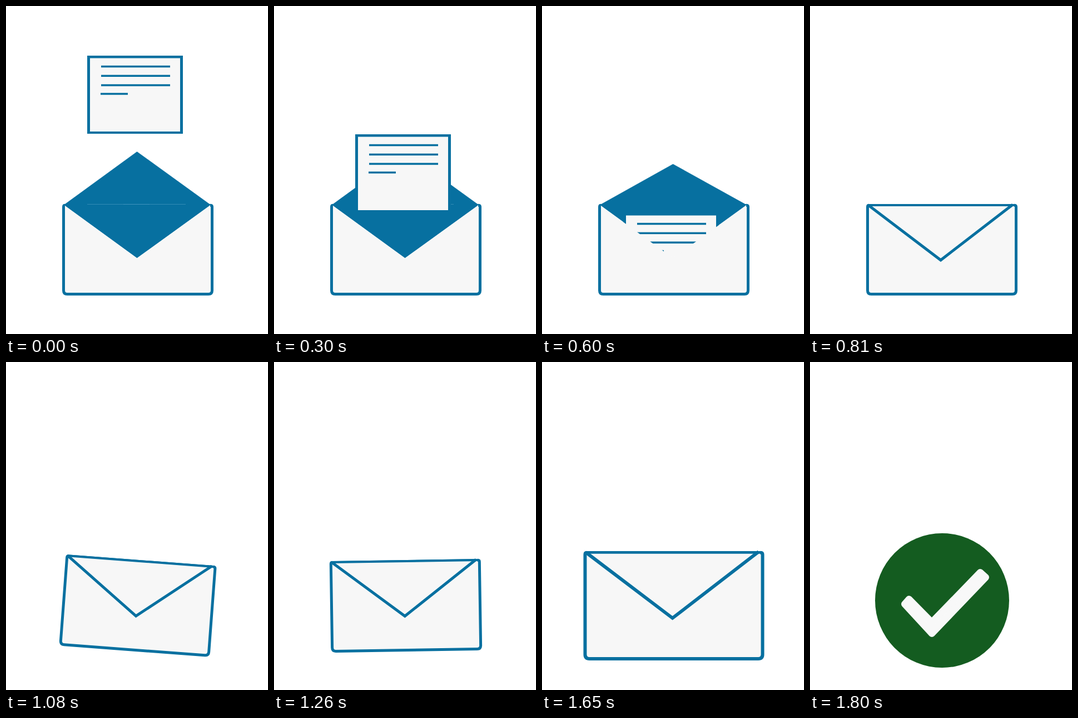
An HTML page that plays this animation: 471x588 px, repeating every 1980 ms.

```html
<!DOCTYPE html>
<html lang="en">
<head>
<meta charset="utf-8">
<title>Letter sent</title>
<style>
  html, body { margin: 0; width: 100%; height: 100%; overflow: hidden; background: #fff; }
  svg { display: block; width: 100%; height: 100%; }
  .ink { fill: #0770a0; }
  .paper { fill: #f7f7f7; }
  .line { fill: none; stroke: #0770a0; }
</style>
</head>
<body>
<svg viewBox="0 0 471 588">
  <g id="mail">
    <path id="flapUp" class="ink"/>
    <path class="ink" d="M105 355H368L366 358 235.5 452 106 358Z"/>
    <g id="seam" stroke="#3f93bd">
      <path d="M146 355.5H323" opacity=".75"/>
      <path d="M211 355.5H258"/>
    </g>
    <g id="letter">
      <path class="ink" d="M146 89H318V229H146Z"/>
      <path class="paper" d="M151 93.5H313V225H151Z"/>
      <path class="line" stroke-width="3.5" d="M171 108.6H295M171 125.2H295M171 141.9H295M170 157.5H219"/>
    </g>
    <path class="paper" d="M105 357.5L235.5 452 367 357.5H371V516H104V357.5Z"/>
    <g id="flapDown">
      <path id="cover" class="paper"/>
      <path id="fold" class="line" stroke-width="5"/>
      <path class="line" stroke-width="4" d="M104 357H370"/>
    </g>
    <path class="line" stroke-width="5" d="M106 357.3Q103.5 357.3 103.5 360V510Q103.5 516.5 110 516.5H364Q370.5 516.5 370.5 510V360Q370.5 357.3 367 357.3"/>
  </g>
  <g id="badge">
    <circle cx="237.5" cy="427.5" r="120.5" fill="#145c20"/>
    <path d="M170 434L178 425 219 466.5 306 377 316 386 219 487Z" fill="#f8f8f8" stroke="#f8f8f8" stroke-width="12" stroke-linejoin="round"/>
  </g>
</svg>
<script>
const LOOP = 1980, STEP = 30, SWAP = 1680;
const el = id => document.getElementById(id);
const part = (t, a, b) => Math.min(1, Math.max(0, (t - a) / (b - a)));
const ease = p => p * p * (3 - 2 * p);
const mix = (a, b, p) => a + (b - a) * p;
const show = (id, on) => el(id).setAttribute('display', on ? 'inline' : 'none');
const about = (x, y, op) => `translate(${x} ${y}) ${op} translate(${-x} ${-y})`;

function drawFlap(t) {
  const turn = Math.cos(Math.PI * part(t, 540, 810));
  const open = turn > 0;
  show('flapUp', open);
  show('seam', t < 570);
  show('flapDown', !open);
  if (open) {
    el('flapUp').setAttribute('d', `M104 356.5L235.5 ${356 - 95 * turn} 368 356.5Z`);
  } else {
    const tip = 356 - 99.5 * turn;
    el('cover').setAttribute('d', `M106 357L235 ${tip} 364 357Z`);
    el('fold').setAttribute('d', `M105.5 357.5L235 ${tip} 364.5 356`);
  }
}

function draw(t) {
  el('letter').setAttribute('transform', `translate(0 ${282 * ease(part(t, 0, 600))})`);
  show('letter', t < 810);
  drawFlap(t);

  // one rock to each side, then swell until the badge takes over
  const tilt = 4.8 * Math.sin(2 * Math.PI * part(t, 990, 1500));
  const swell = mix(1, 1.195, ease(part(t, 1480, 1650)));
  el('mail').setAttribute('transform', about(237, 437, `rotate(${tilt}) scale(${swell})`));
  show('mail', t < SWAP);

  const settle = mix(1.075, 1, ease(part(t, SWAP, 1800)));
  el('badge').setAttribute('transform', about(237.5, 427.5, `scale(${settle})`));
  show('badge', t >= SWAP);
}

let start = null;
function tick(now) {
  if (start === null) start = now;
  const t = Math.max(0, now - start) % LOOP;
  draw(Math.floor(t / STEP + 0.001) * STEP);
  requestAnimationFrame(tick);
}
draw(0);
requestAnimationFrame(tick);
</script>
</body>
</html>
```
